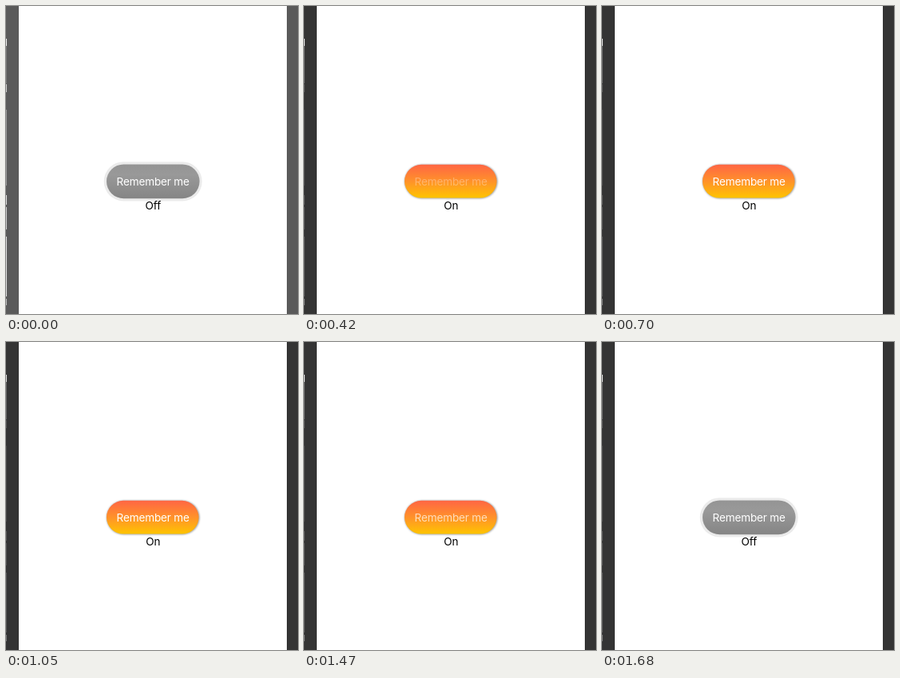
Write an HTML page that moves like this. It is 366 px wide and 386 px high and loops after 1960 ms.

```html
<!DOCTYPE html>
<html lang="en">
<head>
<meta charset="utf-8">
<title>Toggle button</title>
<style>
  html, body { margin: 0; width: 100%; height: 100%; overflow: hidden; background: #fff; }
  svg { display: block; width: 366px; height: 386px; }
  text { font: 400 13.6px Inter, "Open Sans", sans-serif; letter-spacing: -0.18px; text-anchor: middle; }
  #label { fill: #fff; }
</style>
</head>
<body>
<svg viewBox="0 0 366 386">
  <defs>
    <linearGradient id="grey" x2="0" y2="1">
      <stop offset="0" stop-color="#949494"/>
      <stop offset=".3" stop-color="#999"/>
      <stop offset="1" stop-color="#858585"/>
    </linearGradient>
    <linearGradient id="warm" x2="0" y2="1">
      <stop offset="0" stop-color="#ff6644"/>
      <stop offset=".5" stop-color="#ff922a"/>
      <stop offset="1" stop-color="#ffc400"/>
    </linearGradient>
    <filter id="soft" x="-10%" y="-20%" width="120%" height="140%">
      <feGaussianBlur stdDeviation=".8"/>
    </filter>
  </defs>
  <rect width="366" height="386" fill="#fff"/>
  <g id="bars">
    <rect width="16" height="386"/>
    <rect x="352" width="14" height="386"/>
  </g>
  <g id="edge"></g>
  <g id="off">
    <rect x="122.7" y="195.2" width="123" height="49.2" rx="24.6" fill="#ebebeb"/>
    <rect x="126" y="198.4" width="116.6" height="42.8" rx="21.4" fill="url(#grey)"/>
  </g>
  <g id="on">
    <rect x="126" y="198.8" width="116.6" height="42.4" rx="21.2" fill="#777" opacity=".75" filter="url(#soft)"/>
    <rect x="126" y="198.8" width="115.6" height="41.8" rx="20.9" fill="url(#warm)"/>
  </g>
  <text id="label" x="184.2" y="225">Remember me</text>
  <text id="state" x="184.3" y="255"></text>
</svg>
<script>
  const LOOP = 1960;
  const el = id => document.getElementById(id);

  // start ms, switched on, label opacity
  const steps = [
    [0, 0, 1],
    [350, 0, .6],
    [420, 1, .3],
    [490, 1, .5],
    [560, 1, .72],
    [630, 1, .9],
    [700, 1, 1],
    [1330, 1, .95],
    [1400, 1, .85],
    [1470, 1, .68],
    [1540, 0, .4],
    [1610, 0, .75],
    [1680, 0, 1]
  ];

  // slivers of the window behind: y, height, bright tone, dim tone
  const slivers = [
    [41, 9, "#eee", "#ddd"],
    [50, 47, "#777", "#666"],
    [98, 10, "#ccc", "#555"],
    [130, 95, "#999", "#484848"],
    [237, 12, "#ddd", "#555"],
    [252, 28, "#ccc", "#505050"],
    [289, 75, "#ddd", "#555"],
    [367, 8, "#bbb", "#777"]
  ].map(([y, h, bright, dim]) => {
    const r = document.createElementNS("http://www.w3.org/2000/svg", "rect");
    r.setAttribute("y", y);
    r.setAttribute("width", 1);
    r.setAttribute("height", h);
    el("edge").append(r);
    return { r, bright, dim };
  });

  function draw(t) {
    const [, on, alpha] = steps.findLast(s => s[0] <= t);
    const bright = t < 280;
    el("bars").setAttribute("fill", bright ? "#5a5a5a" : "#343434");
    for (const s of slivers) s.r.setAttribute("fill", bright ? s.bright : s.dim);
    el("off").style.display = on ? "none" : "";
    el("on").style.display = on ? "" : "none";
    el("label").style.opacity = alpha;
    el("state").textContent = on ? "On" : "Off";
  }

  const start = performance.now();
  function tick() {
    draw((performance.now() - start) % LOOP);
    requestAnimationFrame(tick);
  }
  tick();
</script>
</body>
</html>
```
